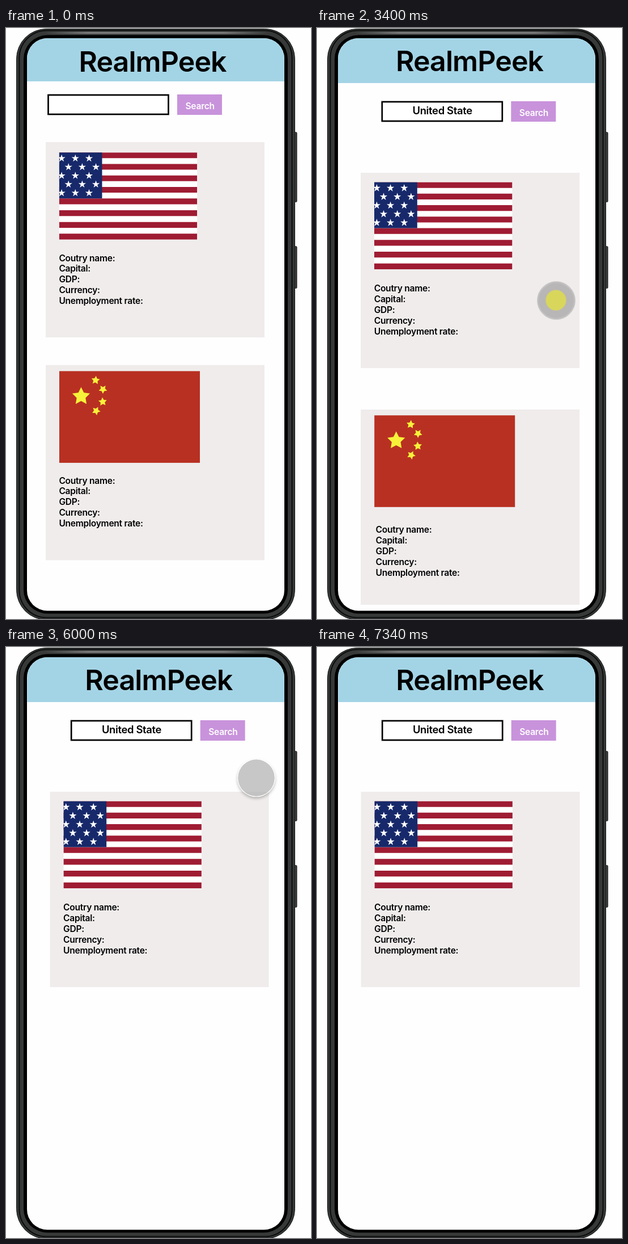
These frames come from a looping animation (538x1041 px, 8220 ms). An HTML page:

```html
<!DOCTYPE html>
<html lang="en">
<head>
<meta charset="utf-8">
<title>RealmPeek</title>
<style>
  html, body { margin: 0; width: 100%; height: 100%; overflow: hidden; background: #fefefe; }
  svg { display: block; }
  text {
    font-family: Inter, "Liberation Sans", sans-serif;
    font-weight: 600; font-size: 15.6px; letter-spacing: -.018em;
  }
  .title { font-size: 50px; text-anchor: middle; }
  .query { font-size: 18.4px; }
  .card { fill: #f0ecec; }

  /* Every change is a hard cut on the 8220 ms loop */
  .home, .results, .match, .cursor, .dot { animation: 8220ms step-end infinite; }
  .home { animation-name: home; }
  .results { animation-name: results; }
  .match { animation-name: match; }
  @keyframes home { 0% { opacity: 1 } 19.46%, 100% { opacity: 0 } }
  @keyframes results { 0% { opacity: 0 } 19.46% { opacity: 1 } 43.91%, 100% { opacity: 0 } }
  @keyframes match { 0% { opacity: 0 } 43.91%, 100% { opacity: 1 } }

  .cursor {
    position: absolute; left: -33.5px; top: -33.5px; width: 67px; height: 67px;
    box-sizing: border-box; border-radius: 50%;
    border: 1.5px solid rgba(255, 255, 255, .92);
    background: rgba(180, 180, 180, .75); background-clip: padding-box;
    box-shadow: 0 3px 5px rgba(0, 0, 0, .25);
    animation-name: move, press;
  }
  .dot {
    position: absolute; left: 14px; top: 14px; width: 36px; height: 36px;
    border-radius: 50%; background: #d9d65c; animation-name: dot;
  }
  @keyframes move {
    0% { transform: translate(-99px, -99px) }
    3.89% { transform: translate(480px, 961px) }
    4.74% { transform: translate(459px, 770px) }
    5.59% { transform: translate(437px, 590px) }
    6.44% { transform: translate(425px, 503px) }
    7.17% { transform: translate(421.5px, 479.5px) }
    72.14% { transform: translate(424px, 430px) }
    72.99% { transform: translate(441px, 230px) }
    73.84% { transform: translate(460px, 68px) }
    74.57% { transform: translate(472px, 130px) }
    75.42% { transform: translate(485px, 400px) }
    76.15% { transform: translate(493px, 680px) }
    76.88% { transform: translate(496px, 867px) }
    77.73% { transform: translate(499px, 950px) }
    78.58% { transform: translate(501px, 1005px) }
    79.44% { transform: translate(502px, 1050px) }
    80.29% { transform: translate(-99px, -99px) }
    82.72% { transform: translate(320px, 1010px) }
    83.57% { transform: translate(310px, 868px) }
    84.3% { transform: translate(314px, 711px) }
    85.15% { transform: translate(332px, 470px) }
    86% { transform: translate(341px, 348px) }
    86.73% { transform: translate(330px, 480px) }
    87.59% { transform: translate(314px, 740px) }
    88.44% { transform: translate(302px, 935px) }
    89.29%, 100% { transform: translate(-99px, -99px) }
  }
  @keyframes press {
    17.03%, 41.36%, 63.26% {
      background-color: #b8b6b6; border-color: #a9a8a8;
      box-shadow: inset 0 0 0 1px #cfcdcd;
    }
    0%, 19.46%, 43.91%, 65.81%, 100% {
      background-color: rgba(180, 180, 180, .75); border-color: rgba(255, 255, 255, .92);
      box-shadow: 0 3px 5px rgba(0, 0, 0, .25);
    }
  }
  @keyframes dot {
    17.03%, 41.36%, 63.26% { opacity: 1 }
    0%, 19.46%, 43.91%, 65.81%, 100% { opacity: 0 }
  }
</style>
</head>
<body>
<svg width="538" height="1041" viewBox="0 0 538 1041">
  <defs>
    <linearGradient id="shine">
      <stop offset="0" stop-color="#777" stop-opacity="0"/>
      <stop offset=".2" stop-color="#777"/>
      <stop offset=".8" stop-color="#777"/>
      <stop offset="1" stop-color="#777" stop-opacity="0"/>
    </linearGradient>
    <linearGradient id="key">
      <stop offset="0" stop-color="#151515"/>
      <stop offset=".5" stop-color="#4a4c4c"/>
      <stop offset="1" stop-color="#151515"/>
    </linearGradient>
    <clipPath id="screen"><rect x="37" y="18" width="454" height="1008.5" rx="36"/></clipPath>

    <path id="star" d="M0-1 .225-.309 .951-.309 .363.118 .588.809 0 .382-.588.809-.363.118-.951-.309-.225-.309z"/>
    <path id="plump" d="M0-1 .294-.405 .951-.309 .476.155 .588.809 0 .5-.588.809-.476.155-.951-.309-.294-.405z"/>
    <g id="row" fill="#fff">
      <use href="#star" transform="translate(4.4 10.5) scale(7)"/>
      <use href="#star" transform="translate(28.6 10.5) scale(7)"/>
      <use href="#star" transform="translate(52.8 10.5) scale(7)"/>
    </g>
    <symbol id="stripes" viewBox="0 0 243.5 153.5">
      <rect width="243.5" height="153.5" fill="#fff"/>
      <g stroke="#9f1c33" stroke-width="243.5">
        <path d="M121.75 0V81" stroke-dasharray="10.125"/>
        <path d="M121.75 81V153.5" stroke-dasharray="10.357"/>
      </g>
      <rect width="75.8" height="81" fill="#17296a"/>
      <use href="#row"/>
      <use href="#row" x="12.1" y="15.25"/>
      <use href="#row" y="30.5"/>
      <use href="#row" x="12.1" y="45.75"/>
      <use href="#row" y="61"/>
    </symbol>
    <g id="red">
      <rect width="248" height="161.5" fill="#b83022"/>
      <g fill="#f7f13a">
        <use href="#plump" transform="translate(38.5 44.5) scale(16.4)"/>
        <use href="#plump" transform="translate(64 16) rotate(6) scale(7.8)"/>
        <use href="#plump" transform="translate(77 32) rotate(36) scale(7.8)"/>
        <use href="#plump" transform="translate(76.5 54) rotate(-4) scale(7.8)"/>
        <use href="#plump" transform="translate(65 70) rotate(26) scale(7.8)"/>
      </g>
    </g>
    <g id="facts">
      <text y="0">Coutry name:</text>
      <text y="18.9">Capital:</text>
      <text y="37.8">GDP:</text>
      <text y="56.7">Currency:</text>
      <text y="75.6">Unemployment rate:</text>
    </g>
    <g id="search">
      <rect x="74.5" y="118" width="212" height="34" fill="#fff" stroke="#000" stroke-width="2.7"/>
      <rect x="302" y="117" width="79" height="36" fill="#c893db"/>
      <text x="316.5" y="143" fill="#fff">Search</text>
    </g>
    <g id="found">
      <rect x="37" y="18" width="454" height="79" fill="#a3d4e5"/>
      <text class="title" x="269" y="76.3">RealmPeek</text>
      <use href="#search" x="40.3" y="12"/>
      <text class="query" x="168.5" y="151.5">United State</text>
      <rect class="card" x="77.2" y="255" width="386" height="344"/>
      <use href="#stripes" x="101" y="271.5" width="243.5" height="153.5"/>
      <use href="#facts" x="100.7" y="464.3"/>
    </g>
  </defs>

  <!-- Phone body -->
  <rect x="507" y="183" width="6.5" height="124" rx="2.5" fill="url(#key)"/>
  <rect x="507" y="384" width="6.5" height="75" rx="2.5" fill="url(#key)"/>
  <rect x="18.5" y="1.5" width="491" height="1041" rx="53" fill="#353838" stroke="#151616"/>
  <rect x="23.5" y="4.5" width="481" height="1034" rx="48" fill="#373939" stroke="#0c0c0c" stroke-width="2"/>
  <rect x="66" y="6.5" width="396" height="4" fill="url(#shine)"/>
  <rect x="31" y="12.5" width="466" height="1019" rx="42" fill="#000"/>

  <g clip-path="url(#screen)">
    <rect x="37" y="18" width="454" height="1009" fill="#fefefe"/>
    <g class="home">
      <rect x="37" y="18" width="454" height="76" fill="#a3d4e5"/>
      <text class="title" x="258.5" y="76.8">RealmPeek</text>
      <use href="#search"/>
      <rect class="card" x="70" y="201" width="386" height="344"/>
      <use href="#stripes" x="93.7" y="219.2" width="243.5" height="153.5"/>
      <use href="#facts" x="93.4" y="410.5"/>
      <rect class="card" x="70" y="593.7" width="386" height="343.7"/>
      <use href="#red" x="94" y="604.4"/>
      <use href="#facts" x="93.4" y="802.6"/>
    </g>
    <g class="results">
      <use href="#found"/>
      <rect class="card" x="77.2" y="672" width="386" height="344"/>
      <use href="#red" x="101.2" y="682.3"/>
      <use href="#facts" x="103.5" y="889.3"/>
    </g>
    <g class="match"><use href="#found" x=".4"/></g>
  </g>
</svg>
<div class="cursor"><div class="dot"></div></div>
</body>
</html>
```
